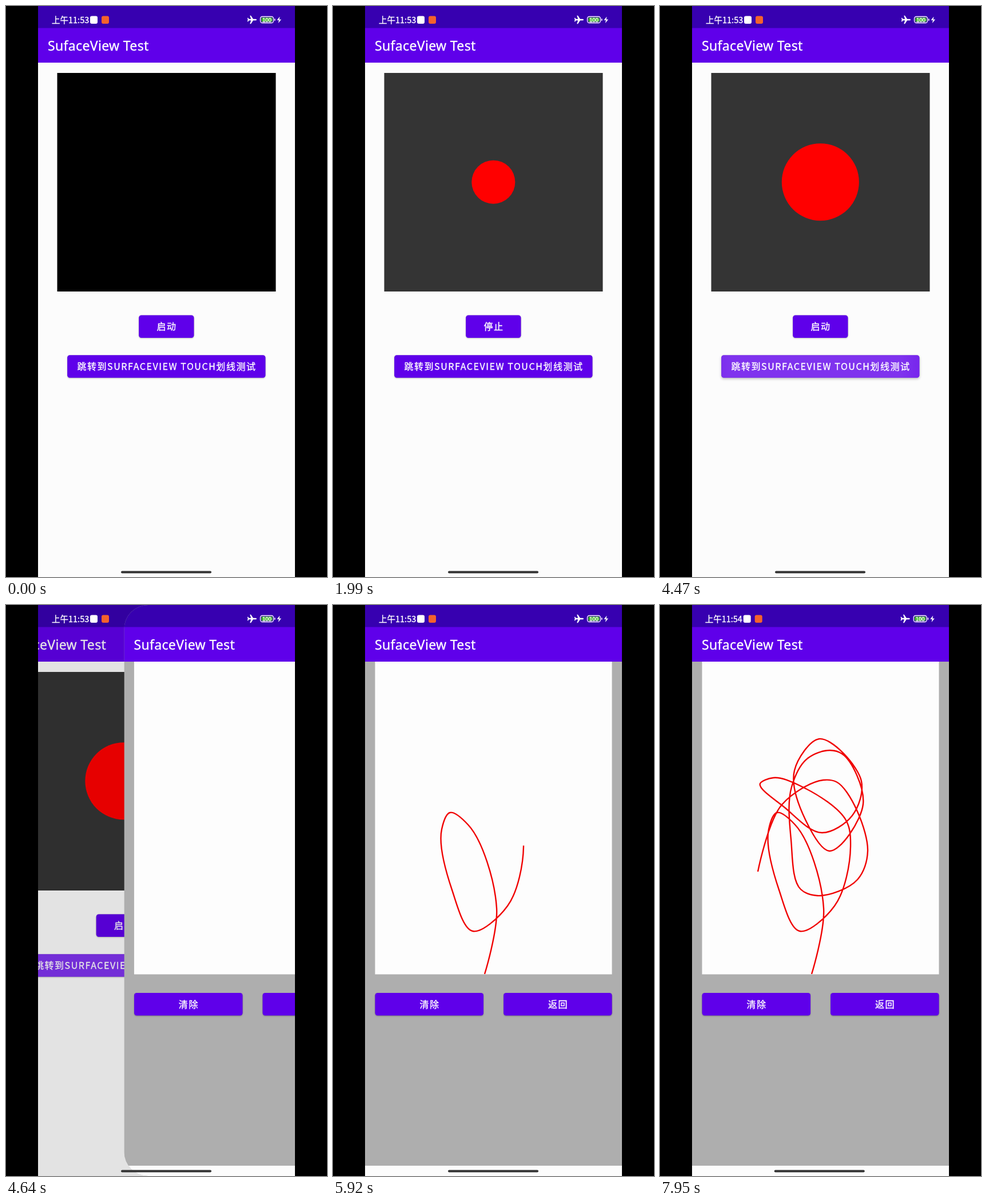
An HTML page that plays this animation: 561 by 998 pixels, repeating every 7.99 s.

```html
<!DOCTYPE html>
<html lang="zh">
<head>
<meta charset="utf-8">
<title>SufaceView Test</title>
<style>
  html, body { margin: 0; width: 100%; height: 100%; overflow: hidden; background: #000; }
  svg { display: block; width: 100%; height: 100%; }
  text { fill: #fff; stroke: #fff; stroke-width: .35px; font-family: "Noto Sans CJK SC", "Noto Sans CJK", "Noto Sans", sans-serif; }
  .title { font-family: "Noto Sans", "Open Sans", sans-serif; font-size: 23px; letter-spacing: .35px; }
  .label { font-size: 16px; letter-spacing: 1.55px; text-anchor: middle; }
  .face { fill: #5f00ea; }
  .bar { fill: #5f00ea; filter: drop-shadow(0 .5px .7px rgba(0,0,0,.2)); }
</style>
</head>
<body>
<svg viewBox="0 0 561 998" xmlns="http://www.w3.org/2000/svg">
  <defs>
    <clipPath id="screen"><rect x="56" width="449" height="998"/></clipPath>
    <clipPath id="sheet"><rect id="sheetShape" x="56" width="560" height="998"/></clipPath>
    <clipPath id="board"><rect x="73.5" y="99" width="414" height="546.5"/></clipPath>
    <radialGradient id="glow">
      <stop offset=".55" stop-color="#fff"/>
      <stop offset="1" stop-color="#fff" stop-opacity="0"/>
    </radialGradient>
  </defs>
  <rect width="561" height="998"/>
  <g clip-path="url(#screen)">
    <g id="home"></g>
    <rect id="dim" x="56" width="449" height="998" opacity="0"/>
    <g id="drawing"></g>
    <g id="status">
      <text id="clock" x="80" y="29.5" font-size="14.5"></text>
      <rect x="147" y="17.5" width="13" height="13.5" rx="3" fill="#fff"/>
      <rect x="167" y="17.5" width="13" height="13.5" rx="3" fill="#f4622c"/>
      <path fill="#fff" d="M438 24q0-1.3-2-1.3h-4l-4-6h-1.8l2 6h-3.6l-1.5-2h-1.3l.9 3.3l-.9 3.3h1.3l1.5-2h3.6l-2 6h1.8l4-6h4q2 0 2-1.3z"/>
      <rect x="444.5" y="18.5" width="23" height="11" rx="3.5" fill="none" stroke="#fff" stroke-width="1.3"/>
      <rect x="446.3" y="20.3" width="19.4" height="7.4" rx="1.8" fill="#43b82c"/>
      <text x="456" y="27.5" font-size="9.5" text-anchor="middle">100</text>
      <rect x="469" y="22" width="1.5" height="4" rx=".7" fill="#fff"/>
      <path fill="#fff" d="M478.5 18.5l-5 6.3h3.4l-1 5.2l5.2-6.6h-3.5z"/>
      <rect x="201" y="987.5" width="158" height="4" rx="2" fill="#333"/>
    </g>
  </g>
</svg>
<script>
const LOOP = 7990;
const START = 270, STOP = 3565, SLIDE = 4478, DRAW = 5400, MID = 5920, DRAWN = 7700, MINUTE = 7950;
const START_TAP = 230, STOP_TAP = 3550, JUMP_TAP = 4290;

const el = id => document.getElementById(id);
const clamp = v => Math.max(0, Math.min(1, v));
const ramp = (t, from, to) => clamp((t - from) / (to - from));

const rect = (x, y, w, h, fill) => `<rect x="${x}" y="${y}" width="${w}" height="${h}" fill="${fill}"/>`;

const header = `
  <rect class="bar" x="56" y="38" width="449" height="61"/>
  ${rect(56, 0, 449, 38.5, '#3700b0')}
  <text class="title" x="73" y="77.5">SufaceView Test</text>`;

const shadow = lift => `drop-shadow(0 0 .5px rgba(0,0,0,.2))
  drop-shadow(0 ${1 + 2.5 * lift}px ${1 + 2 * lift}px rgba(0,0,0,.25))`;

function button(id, centre, middle, w, label) {
  const h = 39.5, x = centre - w / 2, y = middle - h / 2;
  const shape = `x="${x}" y="${y}" width="${w}" height="${h}" rx="4.5"`;
  return `
    <clipPath id="${id}Clip"><rect ${shape}/></clipPath>
    <rect id="${id}Face" class="face" ${shape} style="filter:${shadow(0)}"/>
    <g clip-path="url(#${id}Clip)"><circle id="${id}Ripple" fill="url(#glow)" opacity="0"/></g>
    <text id="${id}Label" class="label" x="${centre + .7}" y="${middle + 5.8}">${label}</text>`;
}

el('home').innerHTML = rect(56, 0, 449, 998, '#fcfcfc') + header +
  `<rect id="surface" x="89.5" y="117" width="382" height="382"/>
   <circle id="ball" cx="280.3" cy="307.7" fill="#f00"/>` +
  button('toggle', 280.3, 560.2, 96.3, '启动') +
  button('jump', 280.3, 630, 346.3, '跳转到SURFACEVIEW TOUCH划线测试');

el('drawing').innerHTML = `<g clip-path="url(#sheet)">` +
  rect(56, 0, 449, 998, '#aeaeae') + rect(56, 980, 449, 18, '#fcfcfc') + header +
  rect(73.5, 99, 414, 546.5, '#fdfdfd') +
  `<g clip-path="url(#board)"><path id="line" fill="none" stroke="#f00000" stroke-width="2.4"/></g>` +
  button('clear', 168.3, 697.7, 189.5, '清除') +
  button('back', 392.8, 697.7, 189.5, '返回') + '</g>';

// Turning points of the finger's path; the first part is drawn faster.
const fastTurns = [
  [265,645], [286,530], [236,384], [204,363], [190,392], [208,498], [244,570], [305,526], [333,422]];
const slowTurns = [
  [326,378], [247,317], [198,302], [175,312], [218,354], [283,398], [336,368], [352,308], [278,234],
  [235,289], [254,375], [296,430], [355,348], [318,260], [297,254], [258,268], [230,318], [229,410],
  [246,497], [275,508], [345,480], [363,430], [308,309], [285,306], [213,349], [171,466]];

// Catmull-Rom through the points, with knots spaced by distance.
function curve(points) {
  const gap = (a, b) => Math.hypot(a[0] - b[0], a[1] - b[1]) ** .7;
  function handle(i, side) {
    const p = points[i], before = points[i - 1], after = points[i + 1];
    if (!before || !after) return p;
    const d1 = gap(before, p), d2 = gap(p, after), reach = side < 0 ? d1 : d2;
    return p.map((v, k) => {
      const slope = ((v - before[k]) / d1 * d2 + (after[k] - v) / d2 * d1) / (d1 + d2);
      return v + side * slope * reach / 3;
    });
  }
  return points.map((p, i) => i ? `C${handle(i - 1, 1)} ${handle(i, -1)} ${p}` : `M${p}`);
}

const line = el('line');
const segments = curve([...fastTurns, ...slowTurns]);
line.setAttribute('d', segments.slice(0, fastTurns.length).join(''));
const midLength = line.getTotalLength();
line.setAttribute('d', segments.join(''));
const fullLength = line.getTotalLength();

function set(id, attrs) {
  for (const name in attrs) el(id).setAttribute(name, attrs[name]);
}

function ripple(id, age, x, y, reach) {
  const grow = 1 - (1 - clamp(age / 450)) ** 2;
  const alpha = .2 * clamp(age / 75) * (1 - ramp(age, 450, 825));
  set(id + 'Ripple', { cx: x, cy: y, r: 6 + reach * grow, opacity: alpha });
  el(id + 'Face').style.filter = shadow(clamp(age / 50) * (1 - ramp(age, 120, 300)));
}

function draw(t) {
  const running = t >= START;
  set('surface', { fill: running ? '#343434' : '#000' });
  set('ball', { r: running ? 5.75 + (Math.min(t, STOP) - START) * .01875 : 0 });
  el('toggleLabel').textContent = running && t < STOP ? '停止' : '启动';
  ripple('toggle', t - (t < STOP_TAP ? START_TAP : STOP_TAP), 263, 560, 110);
  ripple('jump', t - JUMP_TAP, 270, 630, 420);

  // Critically damped slide of the second page over the first.
  const k = Math.max(0, t - SLIDE) * .014;
  let left = (1 + k) * Math.exp(-k);
  if (left < .002) left = 0;
  set('home', { transform: `translate(${-112 * (1 - left)} 0)` });
  set('dim', { opacity: .15 * (1 - left) });
  set('drawing', { transform: `translate(${449 * left} 0)`, visibility: t < SLIDE ? 'hidden' : 'visible' });
  set('sheetShape', { rx: left ? 42 : 0 });

  const drawn = midLength * ramp(t, DRAW, MID) + (fullLength - midLength) * ramp(t, MID, DRAWN);
  set('line', {
    'stroke-dasharray': `${drawn} ${fullLength + 10}`,
    visibility: drawn ? 'inherit' : 'hidden'
  });

  const late = t >= MINUTE;
  el('clock').textContent = late ? '上午11:54' : '上午11:53';
  set('status', { transform: `translate(${late ? -1.3 : 0} 0)` });
}

const begin = performance.now();
function tick() {
  draw((performance.now() - begin) % LOOP);
  requestAnimationFrame(tick);
}
tick();
</script>
</body>
</html>
```
